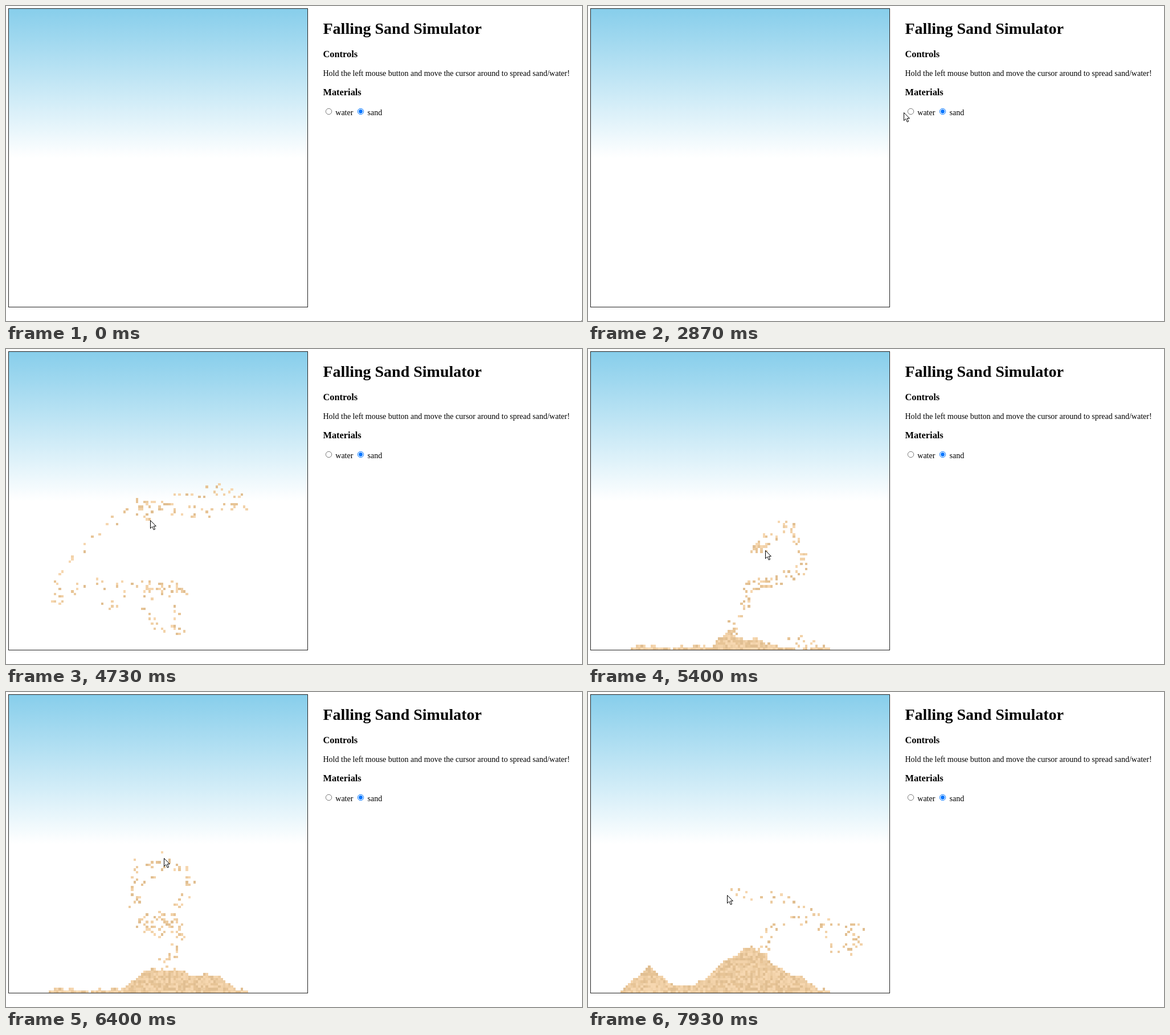
An HTML page with a canvas for the animation above (8000 ms loop, 1011x554 px).

```html
<!DOCTYPE html>
<html lang="en">
<head>
<meta charset="utf-8">
<title>Falling Sand Simulator</title>
<style>
  html, body { margin: 0; width: 100%; height: 100%; overflow: hidden; background: #fff; }
  svg, canvas { position: absolute; left: 0; top: 0; width: 1011px; height: 554px; }
  text { font: 14px "Liberation Serif", "Times New Roman", serif; }
  .h1 { font-size: 28px; font-weight: bold; }
  .h3 { font-size: 16.38px; font-weight: bold; }
</style>
</head>
<body>
<svg viewBox="0 0 1011 554">
  <defs>
    <linearGradient id="sky" x2="0" y2="1">
      <stop stop-color="#87ceeb"/>
      <stop offset=".5" stop-color="#fff"/>
    </linearGradient>
  </defs>
  <rect x="4.5" y="4.5" width="525" height="525" fill="url(#sky)" stroke="#222"/>
  <text class="h1" x="556.5" y="49">Falling Sand Simulator</text>
  <text class="h3" x="556.5" y="89.8">Controls</text>
  <text x="556.5" y="122.7">Hold the left mouse button and move the cursor around to spread sand/water!</text>
  <text class="h3" x="556.5" y="157">Materials</text>
  <circle cx="566.5" cy="185.5" r="5.2" fill="#fff" stroke="#767676"/>
  <text x="578.3" y="191.6">water</text>
  <circle cx="622.5" cy="185.5" r="5.2" fill="#fff" stroke="#0075ff"/>
  <circle cx="622.5" cy="185.5" r="3.4" fill="#0075ff"/>
  <text x="634.6" y="191.6">sand</text>
  <rect id="dot" x="1010" y="553" width="1" height="1" fill="#333"/>
</svg>
<canvas id="stage" width="1011" height="554"></canvas>
<script>
const LOOP = 8000, FRAME = 200 / 3, STEP = 1000 / 91.25;
const SIZE = 120, CELL = 4.375, LEFT = 4.8, TOP = 4.2;
const SPEED = CELL / STEP, RATE = .215, SCATTER = 10;
const SAND = ['#f6d7b0', '#f2d2a9', '#eccca2', '#e7c496', '#e1bf92'];
const ARROW = new Path2D('M.5 .5V14.6L3.8 11.4L6.3 17L8.6 16L6.2 10.6H10.4Z');
const ctx = document.getElementById('stage').getContext('2d');
const dot = document.getElementById('dot');

// Points of an anticlockwise swirl, one per quarter turn
const swirl = (x, y, rx, ry, turn, quarters) => Array.from({ length: quarters + 1 }, (_, i) => {
  const a = 2 * Math.PI * (turn - i / 4);
  return [x + rx * Math.cos(a), y + ry * Math.sin(a)];
});

// A trail says where its grains hang in the air when the stroke ends.
const move = (from, to, ...points) => ({ from, to, points });
const pour = (...args) => ({ ...move(...args), pours: true });
const trail = (...args) => ({ ...pour(...args), hangs: true });

const strokes = [
  move(933, 1333, [478, 421], [287, 241]),
  move(1400, 2133, [287, 241], [257, 154], [208, 122]),
  move(2400, 3267, [208, 122], [420, 155], [614, 200], [624, 182]),
  move(3267, 3733, [630, 180], [187, 140]),
  trail(3900, 4733, [178, 463], ...swirl(284, 457, 40, 46, -.35, 0), ...swirl(284, 457, 40, 46, .9, 3).reverse(),
    [258, 420], [150, 418], [88, 445], [118, 375], [225, 280], [290, 285],
    ...swirl(362, 271, 52, 22, .3, 3), [235, 285], [253, 301]),
  trail(4733, 5400, [253, 567], [238, 525], [272, 462], [290, 420], ...swirl(338, 366, 42, 52, .3, 3), [311, 354]),
  pour(5400, 5840, [311, 354], ...swirl(300, 295, 78, 25, .05, 2), [278, 254]),
  trail(5840, 6400, [278, 478], [302, 440], ...swirl(268, 408, 28, 14, 0, 3),
    ...swirl(270, 342, 58, 46, .15, 3), [277, 292]),
  pour(6400, 7570, [277, 292], ...swirl(275, 300, 38, 25, 0, 2),
    ...swirl(108, 322, 12, 22, 0, 7), [225, 345], [308, 317]),
  trail(7570, 7933, [308, 461], [325, 420], [385, 405], ...swirl(452, 436, 24, 21, .4, 3),
    [375, 385], [310, 360], [244, 357])
];

const clamp = (v, lo, hi) => Math.min(hi, Math.max(lo, v));
const strokeAt = t => strokes.findLast(s => s.from <= t);

// Catmull-Rom spline along the stroke, points evenly spaced in time
function pointer(s, t) {
  const last = s.points.length - 1;
  const p = clamp((t - s.from) / (s.to - s.from), 0, 1) * last;
  const i = Math.min(Math.floor(p), last - 1), u = p - i;
  const [a, b, c, d] = [-1, 0, 1, 2].map(k => s.points[clamp(i + k, 0, last)]);
  const [x, y] = [0, 1].map(k => b[k] + u / 2 * (c[k] - a[k] +
    u * (2 * a[k] - 5 * b[k] + 4 * c[k] - d[k] + u * (3 * (b[k] - c[k]) + d[k] - a[k]))));
  return [x, s.hangs ? y - Math.max(0, s.to - t) * SPEED : y];
}

let grid, step, seed;

function reset() {
  grid = Array.from({ length: SIZE }, () => Array(SIZE).fill(null));
  step = 0;
  seed = 7;
}

function random() {
  seed = (seed + 0x6d2b79f5) | 0;
  let r = Math.imul(seed ^ seed >>> 15, 1 | seed);
  r = r + Math.imul(r ^ r >>> 7, 61 | r) ^ r;
  return ((r ^ r >>> 14) >>> 0) / 4294967296;
}

function fall() {
  for (let r = SIZE - 2; r >= 0; r--) {
    const row = grid[r], below = grid[r + 1];
    for (let c = 0; c < SIZE; c++) {
      if (!row[c]) continue;
      const side = random() < .5 ? -1 : 1;
      const target = [c, c + side, c - side].find(k => below[k] === null);
      if (target === undefined) continue;
      below[target] = row[c];
      row[c] = null;
    }
  }
}

function spread(t) {
  const s = strokeAt(t);
  if (!s || !s.pours || t > s.to) return;
  const [x, y] = pointer(s, t);
  const cell = v => Math.floor((v + (random() * 2 - 1) * SCATTER) / CELL);
  for (let n = Math.floor(t * RATE) - Math.floor((t - STEP) * RATE); n > 0; n--) {
    const c = cell(x - LEFT), r = cell(y - TOP);
    if (grid[r] && grid[r][c] === null) grid[r][c] = SAND[Math.floor(random() * SAND.length)];
  }
}

function simulate(t) {
  const goal = Math.floor(t / STEP);
  if (goal < step) reset();
  while (step < goal) {
    step++;
    fall();
    spread(step * STEP);
  }
}

function draw(t) {
  dot.style.display = t < 130 ? '' : 'none';
  ctx.clearRect(0, 0, 1011, 554);
  const edge = (start, k) => Math.round(start + k * CELL);
  grid.forEach((row, r) => row.forEach((color, c) => {
    if (!color) return;
    const x = edge(LEFT, c), y = edge(TOP, r);
    ctx.fillStyle = color;
    ctx.fillRect(x, y, edge(LEFT, c + 1) - x, edge(TOP, r + 1) - y);
  }));
  const s = strokeAt(t);
  if (!s) return;
  const [x, y] = pointer(s, t);
  ctx.save();
  ctx.translate(Math.round(x), Math.round(y));
  ctx.fillStyle = '#fff';
  ctx.strokeStyle = '#000';
  ctx.fill(ARROW);
  ctx.stroke(ARROW);
  ctx.restore();
}

let shown = -1;
function tick(now) {
  const frame = Math.floor((now % LOOP + 3.4) / FRAME) % 120;
  if (frame !== shown) {
    shown = frame;
    const t = frame * FRAME + .5;
    simulate(t);
    draw(t);
  }
  requestAnimationFrame(tick);
}

reset();
tick(performance.now());
</script>
</body>
</html>
```
